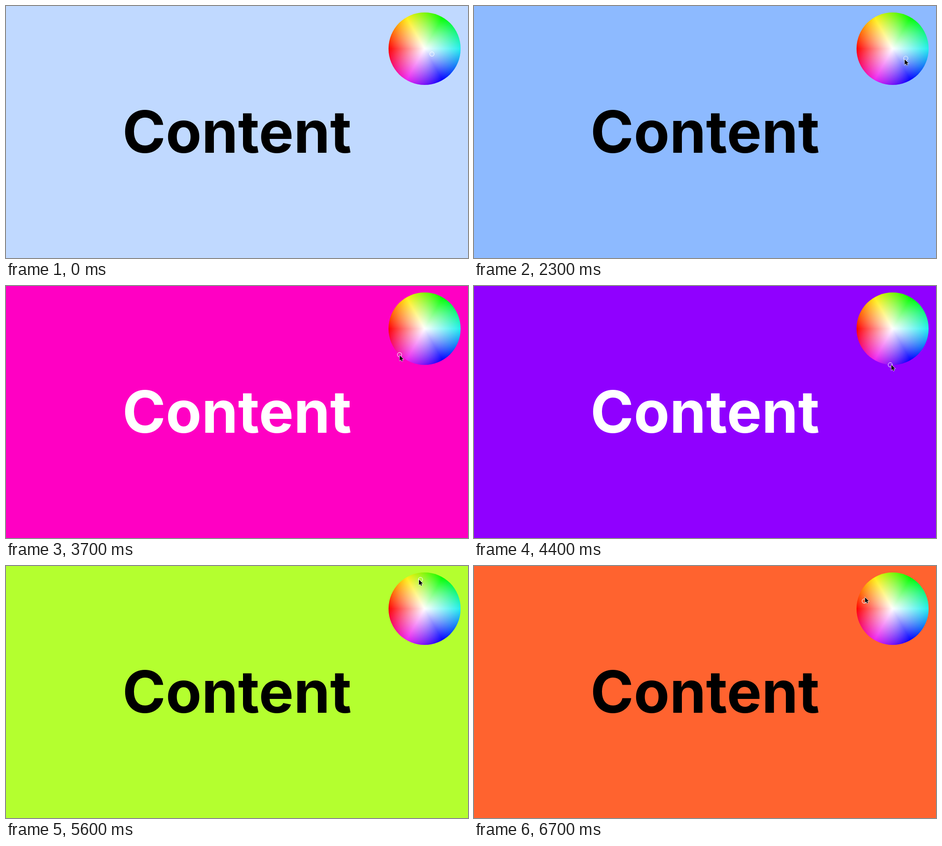
Recreate the animation shown at these times as an HTML page. Size 1000 px wide and 546 px high, loop 6.8 s.

```html
<!DOCTYPE html>
<html lang="en">
<head>
<meta charset="utf-8">
<title>Colour wheel</title>
<style>
  html, body { margin: 0; width: 100%; height: 100%; overflow: hidden; }
  svg { position: absolute; left: 0; top: 0; }
  #wheel {
    position: absolute; left: 828px; top: 14.4px; width: 156.4px; height: 156.4px; border-radius: 50%;
    background:
      radial-gradient(closest-side, #fff, #fff0),
      conic-gradient(from 270deg, #f00, #fe1, #0f0, #2ee, #00f, #e2e, #f00);
  }
  text { font: 700 126.6px Inter, sans-serif; font-optical-sizing: none; text-anchor: middle; }
  #ring { fill: none; stroke: #fff; stroke-opacity: .85; stroke-width: 1.2; }
  #cursor { fill: #000; stroke: #fff; stroke-width: 1.2; paint-order: stroke; }
</style>
</head>
<body>
<div id="wheel"></div>
<svg width="1000" height="546">
  <text id="label" x="500" y="318">Content</text>
  <circle id="ring" r="4.6"/>
  <path id="cursor" d="M-1 0V11.6L1.7 9.1 3.4 13.1 5.3 12.3 3.6 8.4H7.2Z"/>
</svg>
<script>
const LOOP = 6800, STEP = 100, CX = 906.5, CY = 92.5, RADIUS = 78.5;
const ENTER = 1200, DRAG = 1900, START = [97, 60];
const LEAD = 80; // the picker trails the pointer by this many ms

// Turning points of the drag: time, angle clockwise from the right, distance from the centre
const turns = [
  [DRAG, 36.6, 19.3],
  [2300, 36.6, 35],
  [3700, 494.2, 78.5],
  [4400, 454, 78.5],
  [5600, 261.6, 64],
  [6500, 172, 64],
  [LOOP, 203, 64]
];

const $ = id => document.getElementById(id);
const mix = (a, b, k) => a + (b - a) * k;
const clamp = (v, lo, hi) => Math.max(lo, Math.min(hi, v));
const ease = k => k * k * (3 - 2 * k);
const place = (el, [x, y]) => el.setAttribute("transform", `translate(${x} ${y})`);

function dragAt(t) {
  const i = Math.max(1, turns.findIndex(turn => turn[0] > t));
  const [t0, a0, r0] = turns[i - 1], [t1, a1, r1] = turns[i];
  const k = ease(clamp((t - t0) / (t1 - t0), 0, 1));
  return [mix(a0, a1, k), mix(r0, r1, k)];
}

function polar([angle, r]) {
  const a = angle * Math.PI / 180;
  return [CX + r * Math.cos(a), CY + r * Math.sin(a)];
}

// Hue comes from the angle, saturation from the distance to the centre.
function wheelColor([angle, r]) {
  const hue = (angle + 180) % 360 / 60, sat = r / RADIUS;
  return [5, 3, 1].map(n => {
    const k = (n + hue) % 6;
    return Math.round(255 * (1 - sat * clamp(Math.min(k, 4 - k), 0, 1)));
  });
}

function draw(t) {
  const picker = dragAt(t);
  const [red, green, blue] = wheelColor(picker);
  const bright = red * .299 + green * .587 + blue * .114;
  document.body.style.background = `rgb(${red} ${green} ${blue})`;
  $("label").style.fill = bright >= 128 ? "#000" : "#fff";
  place($("ring"), polar(picker));

  const arrive = clamp((t - ENTER) / (DRAG - ENTER), 0, 1);
  const tip = polar(dragAt(t + LEAD));
  $("cursor").style.display = t < ENTER ? "none" : "";
  place($("cursor"), START.map((v, i) => mix(v, tip[i], arrive)));
}

function tick() {
  const t = performance.now() % LOOP;
  draw(Math.floor(t / STEP) * STEP);
  requestAnimationFrame(tick);
}
tick();
</script>
</body>
</html>
```
